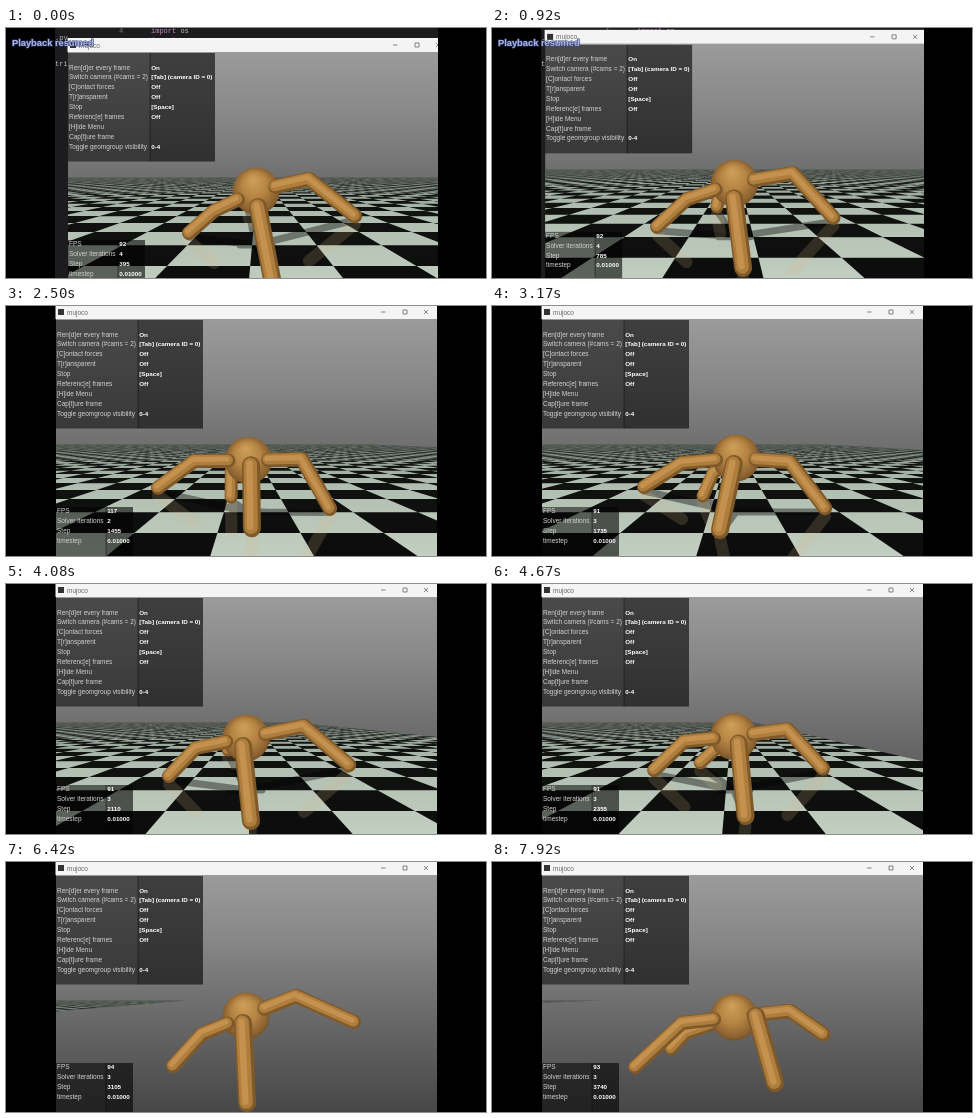
An HTML page that plays this animation: 480 by 250 pixels, repeating every 8000 ms.

```html
<!DOCTYPE html>
<html lang="en">
<head>
<meta charset="utf-8">
<title>Ant simulation</title>
<style>
  html, body { margin: 0; width: 100%; height: 100%; overflow: hidden; background: #000; }
  svg { display: block; width: 480px; height: 250px; }
  text { font-family: "Liberation Sans", Arial, sans-serif; white-space: pre; }
  .label { font-size: 6.5px; fill: #d2d2d2; }
  .value { font-size: 6.25px; font-weight: bold; fill: #fff; }
  .code { font: 7px "Liberation Mono", monospace; fill: #bdbdbd; }
</style>
</head>
<body>
<svg viewBox="0 0 480 250">
  <defs>
    <linearGradient id="sky" gradientUnits="userSpaceOnUse" x1="0" y1="13" x2="0" y2="262">
      <stop offset="0" stop-color="#9b9b9b"/>
      <stop offset=".25" stop-color="#888"/>
      <stop offset=".5" stop-color="#707070"/>
      <stop offset="1" stop-color="#424242"/>
    </linearGradient>
    <linearGradient id="dark" gradientUnits="userSpaceOnUse" x1="0" y1="138" x2="0" y2="262">
      <stop offset="0" stop-color="#50554f"/>
      <stop offset=".05" stop-color="#2b2f2c"/>
      <stop offset=".15" stop-color="#121412"/>
      <stop offset="1" stop-color="#0a0b0a"/>
    </linearGradient>
    <linearGradient id="light" gradientUnits="userSpaceOnUse" x1="0" y1="138" x2="0" y2="262">
      <stop offset="0" stop-color="#59605a"/>
      <stop offset=".1" stop-color="#929f93"/>
      <stop offset=".3" stop-color="#afbdb0"/>
      <stop offset="1" stop-color="#c4d1c3"/>
    </linearGradient>
    <radialGradient id="ball" cx=".5" cy=".5" r=".55" fx=".44" fy=".24">
      <stop offset="0" stop-color="#d0a05a"/>
      <stop offset=".5" stop-color="#b58443"/>
      <stop offset=".85" stop-color="#8a6130"/>
      <stop offset="1" stop-color="#6a4820"/>
    </radialGradient>
    <clipPath id="screen"><rect x="49" width="383" height="250"/></clipPath>
    <clipPath id="view"><rect x="50" y="13" width="381" height="250"/></clipPath>
    <clipPath id="ground"><polygon id="groundEdge"/></clipPath>
  </defs>
  <rect width="480" height="250"/>
  <g clip-path="url(#screen)">
    <g id="editor">
      <rect x="49" width="383" height="250" fill="#1c1c1e"/>
      <text class="code" x="49" y="12">.py</text>
      <text class="code" x="49" y="38">trics.</text>
      <text class="code" x="113" y="5" style="fill:#777">4</text>
      <text class="code" x="145" y="5"><tspan fill="#c586c0">import</tspan> os</text>
      <text class="code" x="145" y="14"><tspan fill="#c586c0">import</tspan> argparse</text>
    </g>
    <g id="win">
      <rect x="49.5" y="-1" width="381.5" height="14" fill="#f4f4f4"/>
      <rect x="52" y="3" width="6" height="6" fill="#333"/>
      <text x="61" y="8.5" font-size="6.5" fill="#666">mujoco</text>
      <path d="M375 6h4.500M397 4h4v4h-4zM418 4l4 4m0-4l-4 4" fill="none" stroke="#555" stroke-width=".7"/>
      <g clip-path="url(#view)">
        <rect x="50" y="13" width="381" height="250" fill="url(#sky)"/>
        <polygon id="base" fill="url(#dark)"/>
        <path id="checks" fill="url(#light)"/>
        <g clip-path="url(#ground)" fill="none" stroke-linecap="round" stroke-linejoin="round">
          <path id="shadow" stroke="#000" stroke-width="7" opacity=".4"/>
          <path id="mirror" stroke="#d6b684" stroke-width="12" opacity=".18"/>
        </g>
        <g id="ant" fill="none" stroke-linecap="round" stroke-linejoin="round"></g>
      </g>
      <g id="panels"></g>
    </g>
  </g>
  <text id="osd" x="6" y="17.500" font-size="9.3" font-weight="bold" fill="#a9b4e6"
    stroke="#34406f" stroke-width="1.2" paint-order="stroke">Playback resumed</text>
</svg>
<script>
const LOOP = 8000, FRAME = 1000 / 12;
const CX = 240.5, HORIZON = 133.5, FOCAL = 291, HEIGHT = 0.75;
const CELL = 2 / 3, FAR = 43, NEAR = 1.65;
const $ = id => document.getElementById(id);

function add(parent, tag, attrs, text) {
  const el = document.createElementNS('http://www.w3.org/2000/svg', tag);
  for (const key in attrs) el.setAttribute(key, attrs[key]);
  if (text !== undefined) el.textContent = text;
  return parent.appendChild(el);
}

// Overlay tables
function panel(x, y, w, h, split, firstRow, rows) {
  add($('panels'), 'rect', { x, y, width: w, height: h, fill: '#000', opacity: .52 });
  add($('panels'), 'rect', { x: split, y, width: x + w - split, height: h, fill: '#000', opacity: .15 });
  add($('panels'), 'rect', { x: split - .4, y, width: .8, height: h, fill: '#000', opacity: .5 });
  return rows.map(([label, value], i) => {
    const line = firstRow + i * 9.88;
    add($('panels'), 'text', { class: 'label', x: 51, y: line }, label);
    return add($('panels'), 'text', { class: 'value', x: split + 1.2, y: line }, value);
  });
}
panel(50, 14, 147, 108.5, 132, 30.5, [
  ['Ren[d]er every frame', 'On'],
  ['Switch camera (#cams = 2)', '[Tab] (camera ID = 0)'],
  ['[C]ontact forces', 'Off'],
  ['T[r]ansparent', 'Off'],
  ['Stop', '[Space]'],
  ['Referenc[e] frames', 'Off'],
  ['[H]ide Menu', ''],
  ['Cap[t]ure frame', ''],
  ['Toggle geomgroup visibility', '0-4']
]);
const [fpsText, iterText, stepText] = panel(50, 201, 77, 49, 100, 207, [
  ['FPS', ''], ['Solver iterations', ''], ['Step', ''], ['timestep', '0.01000']
]);

// Key poses, indexed by tick
const keys = [0, 22, 38, 49, 64, 77, 95];
const steps = [395, 1170, 1735, 2110, 2630, 3105, 3740];
const fps = [92, 117, 91, 91, 93, 94, 93];
const iterations = [4, 2, 3, 3, 3, 3, 3];
const torso = [[238, 152], [241, 154], [244, 152], [240, 154], [244, 154], [240, 154], [242, 155]];

// Each pose: knee x, knee y, foot x, foot y
const legs = [
  { name: 'back', width: 13, phase: 0, poses: [
    [232, 158, 230, 166], [222, 165, 222, 195], [221, 167, 211, 190], [228, 160, 222, 166],
    [219, 161, 190, 183], [230, 160, 226, 166], [194, 171, 179, 187]] },
  { name: 'left', width: 14, phase: 2, poses: [
    [196, 172, 171, 194], [192, 159, 164, 190], [190, 157, 152, 181], [190, 164, 163, 192],
    [188, 154, 145, 185], [196, 172, 167, 204], [190, 161, 143, 205]] },
  { name: 'right', width: 14.5, phase: 4, poses: [
    [291, 140, 337, 177], [297, 143, 322, 194], [298, 156, 333, 202], [298, 142, 343, 181],
    [300, 154, 333, 194], [290, 134, 348, 160], [298, 149, 331, 172]] },
  { name: 'front', width: 18, phase: 1, poses: [
    [240, 168, 255, 245], [246, 168, 259, 230], [242, 158, 228, 224], [237, 162, 245, 237],
    [250, 153, 246, 222], [237, 161, 241, 241], [264, 154, 283, 221]] }
];

const ant = $('ant');
let ball;
for (const leg of legs) {
  const w = leg.width;
  leg.coats = [['#805929', w, 0], ['#ae7e3e', w * .74, -.8], ['#c4924e', w * .36, -1.6]]
    .map(([stroke, width, shift]) => add(ant, 'path', {
      stroke, 'stroke-width': width, transform: `translate(${shift} ${shift})`
    }));
  if (leg.name === 'back') ball = add(ant, 'circle', { r: 23.5, fill: 'url(#ball)' });
}

const lerp = (a, b, u) => a + (b - a) * u;
const mix = (a, b, u) => a.map((v, i) => lerp(v, b[i], u));
const px = (x, d) => (CX + FOCAL * x / d).toFixed(1);
const py = d => (HORIZON + FOCAL * HEIGHT / d).toFixed(1);

function drawFloor(edge) {
  const outline = `0,${py(FAR)} ${px(edge, FAR)},${py(FAR)} ${px(edge, NEAR)},${py(NEAR)} -900,${py(NEAR)} -900,${py(FAR)}`;
  $('base').setAttribute('points', outline);
  $('groundEdge').setAttribute('points', outline);
  let d = '';
  for (let row = 0; FAR - (row + 1) * CELL > NEAR - CELL; row++) {
    const far = FAR - row * CELL, near = Math.max(far - CELL, 1.2);
    const reach = 192 / FOCAL * far;
    const first = Math.max(0, Math.floor((edge - reach) / CELL));
    const last = Math.ceil((edge + reach) / CELL);
    for (let col = first + (first + row) % 2; col < last; col += 2) {
      const right = edge - col * CELL, left = right - CELL;
      d += `M${px(left, far)} ${py(far)}H${px(right, far)}L${px(right, near)} ${py(near)}H${px(left, near)}z`;
    }
  }
  $('checks').setAttribute('d', d);
}

function drawAnt(tick, i, u) {
  const sway = Math.sin(Math.PI * u);
  const [tx, ty] = mix(torso[i], torso[i + 1] || torso[i], u);
  const by = ty + 1.5 * sway * Math.sin(tick * 1.1);
  ball.setAttribute('cx', tx);
  ball.setAttribute('cy', by);
  let shadow = `M${tx - 16} 206h32`, mirror = '';
  for (const leg of legs) {
    let [kx, ky, fx, fy] = mix(leg.poses[i], leg.poses[i + 1] || leg.poses[i], u);
    const a = tick * .9 + leg.phase;
    kx += 4 * sway * Math.sin(a);
    ky += 4 * sway * Math.cos(a);
    fx += 9 * sway * Math.sin(a);
    fy += 5 * sway * Math.cos(a);
    let hx = kx, hy = ky;
    if (leg.name !== 'front') {
      const dist = Math.hypot(kx - tx, ky - by) || 1, r = Math.min(20, dist);
      hx = tx + (kx - tx) / dist * r;
      hy = by + (ky - by) / dist * r;
    }
    for (const coat of leg.coats) coat.setAttribute('d', `M${hx} ${hy}L${kx} ${ky}L${fx} ${fy}`);
    shadow += `M${tx} 206L${fx} ${fy + 4}`;
    mirror += `M${fx} ${fy + 8}L${kx} ${2 * fy - ky + 8}`;
  }
  $('shadow').setAttribute('d', shadow);
  $('mirror').setAttribute('d', mirror);
}

function draw(time) {
  const tick = Math.min(95, Math.floor((time + 5) / FRAME));
  let i = 0;
  while (i < keys.length - 1 && tick >= keys[i + 1]) i++;
  const u = i < keys.length - 1 ? (tick - keys[i]) / (keys[i + 1] - keys[i]) : 0;

  // The window slides to the corner of the screen
  const s = Math.min(1, Math.max(0, (tick - 7) / 6));
  const off = 1 - s * s * (3 - 2 * s);
  $('win').setAttribute('transform', `translate(${12 * off} ${11 * off})`);
  $('editor').style.display = off > 0 ? '' : 'none';
  $('osd').style.display = tick < 12 ? '' : 'none';

  drawFloor(-1.4 - 7 * (tick - 64) / 12);
  drawAnt(tick, i, u);
  fpsText.textContent = fps[i];
  iterText.textContent = iterations[i];
  stepText.textContent = Math.round(lerp(steps[i], steps[i + 1] || steps[i], u) / 5) * 5;
}

let start;
function loop(now) {
  start ??= now;
  draw((now - start) % LOOP);
  requestAnimationFrame(loop);
}
draw(0);
requestAnimationFrame(loop);
</script>
</body>
</html>
```
